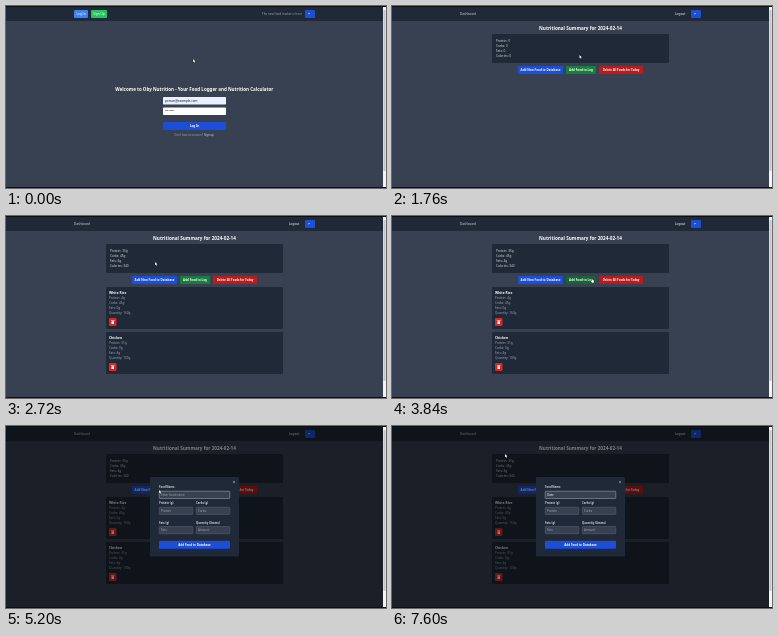
Recreate the animation shown at these times as an HTML page with a canvas. Size 380x182 px, loop 8000 ms.

```html
<!DOCTYPE html>
<html lang="en">
<head>
<meta charset="utf-8">
<title>Nutrition tracker</title>
<style>
  html, body { margin: 0; width: 100%; height: 100%; overflow: hidden; background: #374151; }
  canvas { display: block; width: 100vw; height: 100vh; }
</style>
</head>
<body>
<canvas id="stage"></canvas>
<script>
const W = 380, H = 182, LOOP = 8000, STEP = 80;
const canvas = document.getElementById('stage');
const ctx = canvas.getContext('2d');
const ratio = window.devicePixelRatio || 1;
canvas.width = W * ratio;
canvas.height = H * ratio;

const C = {
  page: '#374151', panel: '#1f2937', blue: '#1d4ed8', blueHover: '#1e40af',
  green: '#15803d', greenHover: '#166534', red: '#b91c1c', white: '#fff',
  soft: '#d1d5db', muted: '#9ca3af', line: '#6b7280'
};

// Pointer path: time, x, y of the tip
const PATH = [
  [0, 187, 53], [80, 187, 53], [160, 187, 53.5], [320, 187, 54], [560, 191, 118],
  [720, 191, 118], [880, 191, 62], [1120, 191, 61], [1280, 187.5, 49], [1760, 187.5, 49],
  [2160, 112, 46], [2400, 112, 46], [2720, 149, 46], [3120, 168, 74], [3520, 168, 74],
  [3840, 199, 62.5], [4320, 198, 63], [4720, 155, 63], [4880, 155, 63], [4960, 157, 63],
  [5120, 157, 63], [5200, 153, 64], [5840, 153, 64], [6160, 113.5, 29], [6320, 113, 28],
  [LOOP, 113, 28]
];

function box(x, y, w, h, fill, radius = 0, stroke) {
  ctx.beginPath();
  ctx.roundRect(x, y, w, h, radius);
  ctx.fillStyle = fill;
  ctx.fill();
  if (stroke) {
    ctx.strokeStyle = stroke;
    ctx.lineWidth = .4;
    ctx.stroke();
  }
}

function text(str, x, y, size, color = C.white, { bold = false, align = 'left' } = {}) {
  ctx.font = `${bold ? 'bold ' : ''}${size}px "Noto Sans", sans-serif`;
  ctx.textAlign = align;
  ctx.textBaseline = 'alphabetic';
  ctx.fillStyle = color;
  ctx.fillText(str, x, y + size * .36);
}

function button(label, x, y, w, fill, size = 2.98, bold = true) {
  box(x, y, w, 8, fill, 1);
  text(label, x + w / 2, y + 4, size, C.white, { bold, align: 'center' });
}

function lines(rows, x, y, gap, color) {
  rows.forEach((row, i) => text(row, x, y + i * gap, 3.1, color));
}

function navBar(loggedIn) {
  box(0, 1, 377, 14, C.panel);
  if (loggedIn) {
    text('Dashboard', 68, 8, 3.1, C.soft);
    text('Logout', 283, 8, 3.1, C.white);
  } else {
    button('Log In', 68, 4, 14, '#3b82f6', 3.1, false);
    button('Sign Up', 85, 4, 16, '#22c55e', 3.1, false);
    text('The new food tracker is here', 296, 8, 3, C.muted, { align: 'right' });
  }
  box(299, 4, 10, 8, C.blue, 1);
  ctx.beginPath();
  ctx.arc(304, 8, 1.5, -1.9, 2.8, true);
  ctx.quadraticCurveTo(304.2, 8, 303.5, 6.6);
  ctx.fillStyle = C.white;
  ctx.fill();
}

function loginPage() {
  text('Welcome to Oby Nutrition - Your Food Logger and Nutrition Calculator',
    188.3, 83.5, 4.5, C.white, { bold: true, align: 'center' });
  box(157, 91, 63, 7.5, '#e8f0fe', .8);
  text('person@example.com', 159, 94.8, 3.1, '#111827');
  box(157, 101.5, 63, 7.5, '#fff', .8);
  text('••••••••', 159, 105.3, 3.1, '#111827');
  button('Log In', 157, 116, 63, C.blue, 3.1);
  text("Don't have an account?", 168.5, 129, 2.6, C.muted);
  text('Sign up', 198, 129, 2.75, '#bfdbfe');
}

function foodCard(y, name, rows) {
  box(100, y, 177, 42, C.panel, 1);
  text(name, 103, y + 5.8, 3.3, C.white, { bold: true });
  lines(rows, 103, y + 11, 4.8, C.muted);
  box(103, y + 31, 7.5, 8, '#dc2626', 1);
  box(105.5, y + 34.2, 2.5, 2.8, C.white, .3);
  box(105, y + 33.2, 3.5, .6, C.white);
}

function summaryPage(filled, hover) {
  text('Nutritional Summary for 2024-02-14', 188.5, 22, 4.65, C.white,
    { bold: true, align: 'center' });
  box(100, 28, 177, 29, C.panel, 1);
  const totals = filled ? ['35g', '45g', '4g', '340'] : ['0', '0', '0', '0'];
  const names = ['Protein', 'Carbs', 'Fats', 'Calories'];
  lines(names.map((name, i) => `${name}: ${totals[i]}`), 104, 35, 4.8, C.soft);
  button('Add New Food to Database', 126, 60, 45, hover === 'blue' ? C.blueHover : C.blue);
  button('Add Food to Log', 174, 60, 30, hover === 'green' ? C.greenHover : C.green);
  button('Delete All Foods for Today', 207, 60, 44, C.red, 2.85);
  if (filled) {
    foodCard(71, 'White Rice', ['Protein: 4g', 'Carbs: 45g', 'Fats: 0g', 'Quantity: 160g']);
    foodCard(116, 'Chicken', ['Protein: 31g', 'Carbs: 0g', 'Fats: 4g', 'Quantity: 100g']);
  }
}

function field(label, hint, x, y, w, value = '', focused = false) {
  text(label, x, y - 3.6, 2.75, C.soft, { bold: true });
  box(x + .2, y + .2, w - .4, 7.3, C.page, .7, focused ? C.soft : C.line);
  text(value || hint, x + 2, y + 3.9, 3, value ? C.white : C.muted);
}

function foodName(t) {
  if (t < 5760) return '';
  if (t < 5920) return 'O';
  if (t < 6160) return 'Oa';
  if (t < 6960) return '';
  if (t < 7360) return 'O';
  return t < 7600 ? 'Oat' : 'Oats';
}

function modal(t) {
  box(0, 1, 377, 180, 'rgba(0,0,0,.5)');
  box(144, 51, 89, 79.5, C.panel, 1);
  text('×', 228, 56, 4.5, C.soft, { align: 'center' });
  field('Food Name', 'Enter food name', 153, 65, 71, foodName(t), true);
  field('Protein (g)', 'Protein', 153, 81, 34);
  field('Carbs (g)', 'Carbs', 190, 81, 34);
  field('Fats (g)', 'Fats', 153, 100.3, 34);
  field('Quantity (Grams)', 'Amount', 190, 100.3, 34);
  button('Add Food to Database', 153, 114.7, 71, C.blue);
  if ((t >= 5920 && t < 6160) || (t >= 7360 && t < 7600)) {
    box(156, 73, 47, 9.5, '#2b2a33', .6, C.line);
    text('Oats', 158, 77.8, 3, C.white);
  }
}

function pointerAt(t) {
  const i = PATH.findIndex(point => point[0] > t);
  const [t0, x0, y0] = PATH[i - 1], [t1, x1, y1] = PATH[i];
  const p = (t - t0) / (t1 - t0), ease = p * p * (3 - 2 * p);
  return [x0 + (x1 - x0) * ease, y0 + (y1 - y0) * ease];
}

function pointer(x, y, hand) {
  ctx.save();
  ctx.translate(x, y);
  const shape = new Path2D(hand
    ? 'M.8 0Q1.3 -.2 1.4 .4V1.5L3 1.9V3.5L2.5 4.2H1L-.3 2.6L.3 2.2L.8 2.5Z'
    : 'M0 0L0 3.2L.8 2.6L1.3 3.7L1.9 3.4L1.4 2.4L2.4 2.3Z');
  ctx.strokeStyle = '#111';
  ctx.lineWidth = .6;
  ctx.stroke(shape);
  ctx.fillStyle = C.white;
  ctx.fill(shape);
  ctx.restore();
}

function draw(t) {
  const [x, y] = pointerAt(t);
  const loggedIn = t >= 720, modalOpen = t >= 5200;
  let hover = '';
  if (loggedIn && !modalOpen && y >= 60 && y <= 68) {
    if (x >= 126 && x <= 171) hover = 'blue';
    if (x >= 174 && x <= 204) hover = 'green';
  }
  ctx.setTransform(ratio, 0, 0, ratio, 0, 0);
  box(0, 0, W, H, '#0b0f16');
  box(0, 1, 377, 180, C.page);
  navBar(loggedIn);
  if (loggedIn) summaryPage(t >= 1840, hover);
  else loginPage();
  if (modalOpen) modal(t);
  box(377, 1, 3, 180, '#f3f4f6');
  box(377.4, 4, 2.2, 161, '#c4c6ca', .8);
  pointer(x, y, hover || (!loggedIn && y > 115));
}

function tick(now) {
  draw(Math.floor(now % LOOP / STEP) * STEP);
  requestAnimationFrame(tick);
}
requestAnimationFrame(tick);
</script>
</body>
</html>
```
